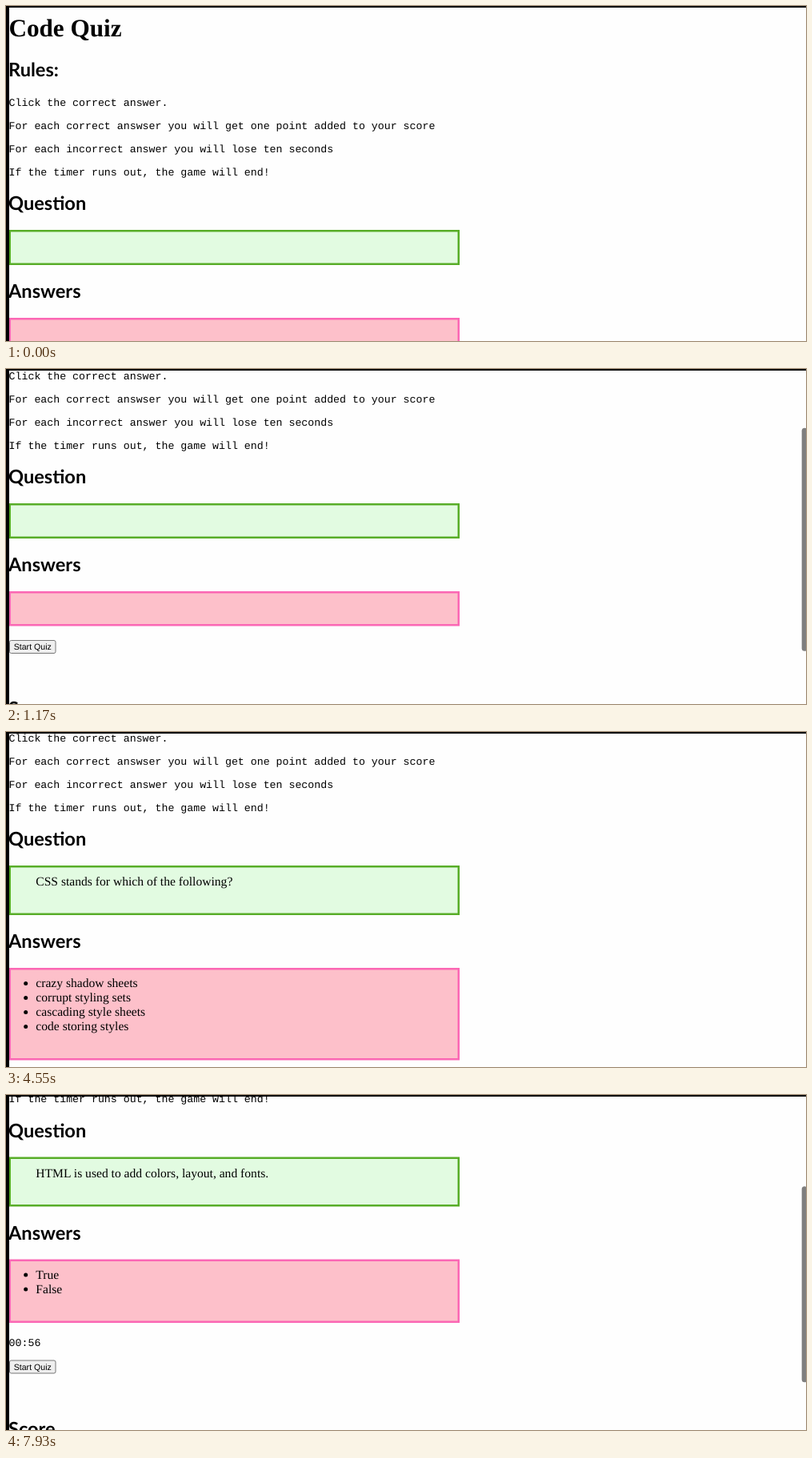
Animation of 1000x419 px, one loop 8 s. Source, as an HTML page with a canvas:

```html
<!DOCTYPE html>
<html lang="en">
<head>
<meta charset="utf-8">
<title>Code Quiz</title>
<style>
html, body { margin: 0; width: 100%; height: 100%; overflow: hidden; background: #fefefe; }
canvas { display: block; width: 100%; height: 100%; }
</style>
</head>
<body>
<canvas id="stage" width="1000" height="419"></canvas>
<script>
const W = 1000, H = 419, LOOP = 8000;
const ctx = document.getElementById('stage').getContext('2d');
ctx.textRendering = 'geometricPrecision';

const FONT = {
  title: 'bold 31.2px "Liberation Serif", serif',
  head: 'bold 23.6px Lato, sans-serif',
  mono: '13.26px "Liberation Mono", monospace',
  body: '15.6px "Liberation Serif", serif',
  button: '10.6px "Liberation Sans", sans-serif'
};

const RULES = [
  'Click the correct answer.',
  'For each correct answser you will get one point added to your score',
  'For each incorrect answer you will lose ten seconds',
  'If the timer runs out, the game will end!'
];

// A question stays until the next one starts.
const QUIZ = [
  { at: 2340, ask: 'What is the process of finding and removing errors in a program?',
    options: ['debugging', 'downloading', 'uploading', 'storing'] },
  { at: 4550, ask: 'CSS stands for which of the following?',
    options: ['crazy shadow sheets', 'corrupt styling sets', 'cascading style sheets', 'code storing styles'] },
  { at: 6760, ask: 'HTML is used to add colors, layout, and fonts.',
    options: ['True', 'False'] }
];

// Page position and scrollbar opacity, held between screen refreshes.
const SCROLL = [
  { at: 0, y: 0, bar: 0 },
  { at: 780, y: 18, bar: 1 },
  { at: 910, y: 55, bar: 1 },
  { at: 1040, y: 92, bar: 1 },
  { at: 1170, y: 112, bar: 1 },
  { at: 1300, y: 113, bar: 1 },
  { at: 1820, y: 113, bar: 0.5 },
  { at: 1950, y: 113, bar: 0 },
  { at: 7540, y: 122, bar: 1 },
  { at: 7670, y: 148, bar: 1 },
  { at: 7800, y: 178, bar: 1 },
  { at: 7930, y: 202.5, bar: 1 }
];

const current = (list, t) => list.filter(e => e.at <= t).pop();

function text(str, x, y, font) {
  ctx.font = font;
  ctx.fillStyle = '#000';
  ctx.fillText(str, x, y);
}

function panel(y, h, fill, edge) {
  ctx.fillStyle = edge;
  ctx.fillRect(3.5, y, 563.5, h);
  ctx.fillStyle = fill;
  ctx.fillRect(6, y + 2.5, 558.5, h - 5);
}

function pill(x, y, w, h, r) {
  ctx.beginPath();
  ctx.roundRect(x, y, w, h, r);
}

function button(y) {
  pill(4.5, y + 0.5, 57.5, 16, 2);
  ctx.fillStyle = '#efefef';
  ctx.fill();
  ctx.strokeStyle = '#767676';
  ctx.lineWidth = 1;
  ctx.stroke();
  text('Start Quiz', 9.7, y + 12.3, FONT.button);
}

function options(list, y) {
  list.forEach((item, i) => {
    const base = y + 24 + i * 18;
    ctx.beginPath();
    ctx.arc(24.7, base - 4.6, 2.5, 0, 7);
    ctx.fillStyle = '#000';
    ctx.fill();
    text(item, 37.3, base, FONT.body);
  });
}

// Draws the page and returns its extra height over the idle layout.
function page(quiz, t) {
  text('Code Quiz', 3.4, 37.5, FONT.title);
  text('Rules:', 3, 88, FONT.head);
  RULES.forEach((line, i) => text(line, 3.6, 124.7 + i * 29, FONT.mono));

  const askH = quiz ? 62 : 44;
  const listH = quiz ? 43.5 + quiz.options.length * 18 : 43.5;
  text('Question', 3, 255.3, FONT.head);
  panel(280, askH, '#e2fbe1', '#58ad28');
  if (quiz) text(quiz.ask, 37.3, 305, FONT.body);

  const listY = 346 + askH;
  text('Answers', 3, listY - 25, FONT.head);
  panel(listY, listH, '#fdc0ca', '#fb67b4');

  let buttonY = listY + listH + 17.5;
  if (quiz) {
    options(quiz.options, listY);
    text(t < 7540 ? '00:57' : '00:56', 3.6, buttonY + 11, FONT.mono);
    buttonY += 29;
  }
  buttonY = Math.round(buttonY);
  button(buttonY);
  text('Score', 3, buttonY + 94, FONT.head);
}

function scrollbar(view, quiz) {
  if (!view.bar) return;
  const length = quiz ? 245 : 279;
  const rate = quiz ? 0.54 : 0.614;
  ctx.globalAlpha = view.bar;
  ctx.fillStyle = '#7f7f7f';
  pill(994.7, 5 + view.y * rate, 7, length, 3.5);
  ctx.fill();
  ctx.globalAlpha = 1;
}

function draw(now) {
  const t = now % LOOP;
  const view = current(SCROLL, t);
  const quiz = current(QUIZ, t);

  ctx.fillStyle = '#fefefe';
  ctx.fillRect(0, 0, W, H);
  ctx.save();
  ctx.translate(0, -view.y);
  page(quiz, t);
  ctx.restore();
  scrollbar(view, quiz);

  ctx.fillStyle = '#000';
  ctx.fillRect(0, 0, W, 2);
  ctx.fillRect(0, 0, 4, H);
}

const start = performance.now();
function tick() {
  draw(performance.now() - start);
  requestAnimationFrame(tick);
}
tick();
</script>
</body>
</html>
```
